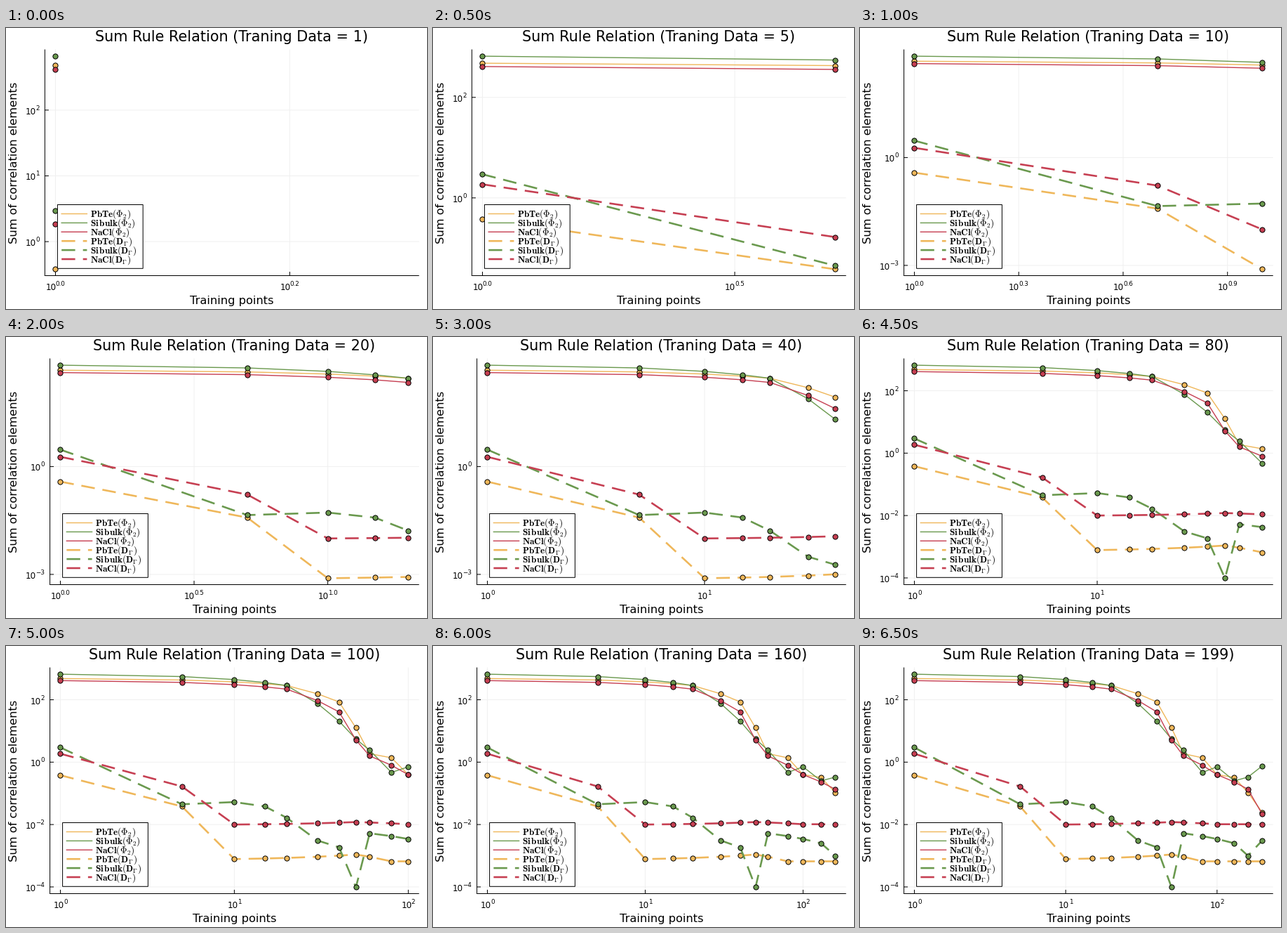
A matplotlib script that plays this animation: 600x400 px, repeating every 7 s.

```python
import numpy as np
import matplotlib.pyplot as plt
from matplotlib.animation import FuncAnimation
from matplotlib.patches import Rectangle

plt.rcParams["font.family"] = "DejaVu Sans"
plt.rcParams["mathtext.fontset"] = "cm"

W, H = 600, 400
PT = 0.72  # points per pixel at 100 dpi
TOP, BOTTOM, RIGHT = 31, 352.5, 588.2
TITLE, GUIDE, TICK, LEGEND = 20.77, 16.25, 11.87, 13.2  # font sizes in px
COLORS = ["#efb75a", "#6a994e", "#c63f52"] * 2
NAMES = ["PbTe", r"Si\,bulk", "NaCl"]

points = np.array([1, 5, *range(10, 21, 5), *range(30, 61, 10),
                   80, 100, 130, 160, 199])
logx = np.log10(points)


def curve_through(*knots):
    """Log10 sums, straight between (training points, value) knots."""
    return np.interp(points, *zip(*knots))


series = np.array([
    # force constants
    curve_through((1, 2.68), (20, 2.455), (40, 1.93), (60, 0.27), (80, 0.14),
                  (100, -0.4), (130, -0.49), (199, -1.61)),
    curve_through((1, 2.82), (20, 2.455), (50, 0.74), (80, -0.33),
                  (100, -0.15), (130, -0.6), (160, -0.48), (199, -0.12)),
    curve_through((1, 2.614), (20, 2.34), (40, 1.61), (50, 0.71), (60, 0.2),
                  (100, -0.4), (160, -0.87), (199, -1.67)),
    # dynamical matrices
    curve_through((1, -0.42), (5, -1.42), (10, -3.107), (50, -2.96),
                  (80, -3.18), (199, -3.18)),
    curve_through((1, 0.47), (5, -1.35), (10, -1.28), (15, -1.42), (30, -2.51),
                  (40, -2.73), (50, -4.01), (60, -2.28), (130, -2.6),
                  (160, -3.0), (199, -2.51)),
    curve_through((1, 0.27), (5, -0.78), (10, -2.0), (50, -1.92),
                  (100, -1.99), (199, -1.99)),
])
labels = [r"$\mathbf{%s}(\Phi_2)$" % n for n in NAMES]
labels += [r"$\mathbf{%s}(\mathbf{D}_\Gamma)$" % n for n in NAMES]

fig = plt.figure(figsize=(W / 100, H / 100), dpi=100, facecolor="white")
ax = fig.add_axes([0, 0, 1, 1])


def line(x, y, color="black", width=1.0, **kw):
    ax.plot(x, y, color=color, lw=width * PT, snap=False, **kw)


def write(x, y, s, size, **kw):
    ax.text(x, y, s, fontsize=size * PT, va="baseline", **kw)


def stroke(x, y, k, **kw):
    """Thin solid line for the first three series, thick dashes after."""
    if k < 3:
        line(x, y, COLORS[k], 1.4, **kw)
    else:
        w = 2.6
        line(x, y, COLORS[k], w, dashes=(19.4 / w, 11.1 / w),
             dash_capstyle="butt", **kw)


def advance(s, size):
    em = {".": 0.318, "\u2212": 0.838}
    return size * sum(em.get(c, 0.636) for c in s)


def power(x, base, exp, align):
    """Write 10^exp with its middle (0.5) or right end (1) at x."""
    exp = exp.replace("-", "\u2212")
    small = TICK * 0.74
    ten = advance("10", TICK) - 0.6
    x -= align * (ten + advance(exp, small))
    write(x, base, "10", TICK)
    write(x + ten, base - 6, exp, small)


def multiples(step, lo, hi):
    return step * np.arange(np.ceil(lo / step), np.floor(hi / step) + 1)


def tick_steps(i):
    """Exponent steps along x and y, and decimals shown along x."""
    x = (0.2, 0.5, 0.3, 0.25, 0.5)[i] if i < 5 else 1
    y = i + 1 if i < 2 else 3 if i < 7 else 2
    return x, y, 0 if x == 1 else 2 if x == 0.25 else 1


def legend(left):
    x, y = left + 18, 251.5
    ax.add_patch(Rectangle((x, y), 121.8, 90.8, fc="white", ec="black",
                           lw=PT, snap=False, zorder=8))
    for k, s in enumerate(labels):
        row = 264.5 + 12.9 * k
        stroke([x + 5.8, x + 42], [row, row], k, zorder=9)
        write(x + 46.6, row + 4.3, s, LEGEND, zorder=9)


def draw(i):
    ax.clear()
    ax.set_xlim(0, W)
    ax.set_ylim(H, 0)
    ax.axis("off")

    left = 55.4 if i < 2 else 62.6
    mid = (left + RIGHT) / 2
    xs, ys = logx[:i + 1], series[:, :i + 1]
    xspan = xs[-1] if i else np.log10(2)
    lo, hi = ys.min(), ys.max()
    yspan = hi - lo
    xunit = (RIGHT - left) / 1.06 / xspan
    yunit = (BOTTOM - TOP) / 1.06 / yspan

    def px(v):
        return left + (v + 0.03 * xspan) * xunit

    def py(v):
        return TOP + (hi + 0.03 * yspan - v) * yunit

    xstep, ystep, digits = tick_steps(i)
    for v in multiples(xstep, 0, 1.03 * xspan):
        x = px(v)
        line([x, x], [TOP, BOTTOM], "#f0f0f0", zorder=1)
        line([x, x], [BOTTOM, BOTTOM - 5], zorder=2)
        power(x, 373, "%.*f" % (digits, v), 0.5)
    for v in multiples(ystep, lo - 0.03 * yspan, hi + 0.03 * yspan):
        y = py(v)
        line([left, RIGHT], [y, y], "#f0f0f0", zorder=1)
        line([left, left + 5], [y, y], zorder=2)
        power(left - 7.8, y + 6, "%d" % v, 1)
    line([left, left], [TOP, BOTTOM], zorder=2)
    line([left, RIGHT], [BOTTOM, BOTTOM], zorder=2)

    for k in range(6):
        z = 3 + k * 0.1
        stroke(px(xs), py(ys[k]), k, zorder=z)
        ax.scatter(px(xs), py(ys[k]), s=(7.2 * PT) ** 2, color=COLORS[k],
                   edgecolors="black", linewidths=PT, zorder=z + 0.05)
    legend(left)

    write(mid, 18.7, "Sum Rule Relation (Traning Data = %d)" % points[i],
          TITLE, ha="center")
    write(mid, 393.3, "Training points", GUIDE, ha="center")
    write(16.4, (TOP + BOTTOM) / 2, "Sum of correlation elements", GUIDE,
          ha="center", rotation=90, rotation_mode="anchor")
    return []


anim = FuncAnimation(fig, draw, frames=len(points), init_func=lambda: [],
                     interval=500, repeat=True, repeat_delay=0)
plt.show()
```
